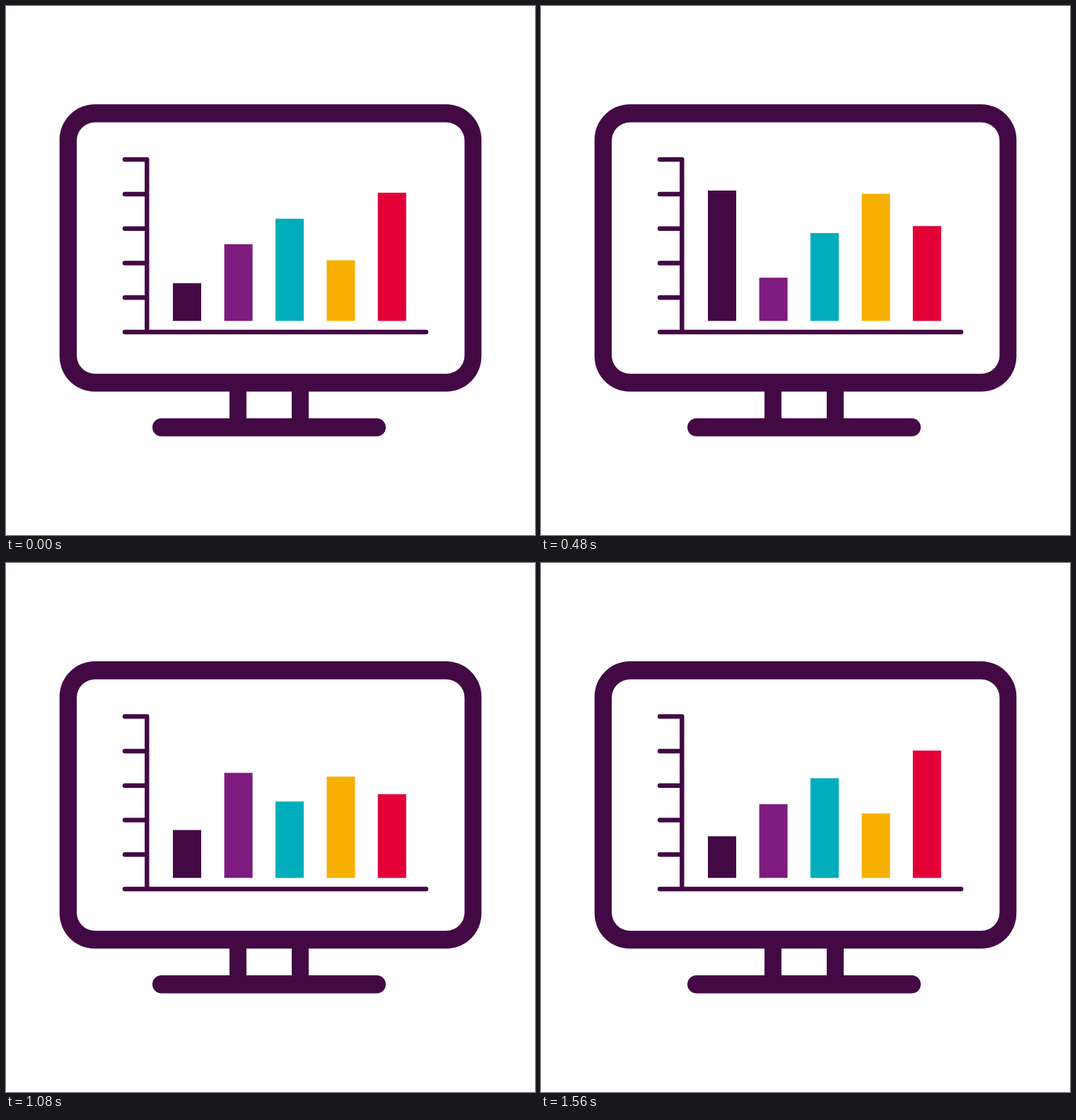
Write an HTML page that moves like this. It is 748 by 748 pixels and loops after 1600 ms.

```html
<!DOCTYPE html>
<html lang="en">
<head>
<meta charset="utf-8">
<title>Bar chart on a monitor</title>
<style>
  html, body { margin: 0; width: 100%; height: 100%; overflow: hidden; background: #fff; }
  svg { display: block; width: 100%; height: 100%; }
</style>
</head>
<body>
<svg viewBox="0 0 748 748" fill="#430945">
  <rect x="75.7" y="139" width="596.6" height="406.3" rx="50"/>
  <rect x="100" y="164.5" width="548.4" height="355.5" rx="26" fill="#fff"/>
  <path d="M316 544h24v40h-24zM404 544h24v40h-24z"/>
  <rect x="207" y="583" width="330" height="25.5" rx="12.75"/>
  <path d="M199.3 217V461M168 217h31.3M168 266h31.3M168 314.8h31.3M168 363.5h31.3M168 412.2h31.3M168 461H594"
        fill="none" stroke="#430945" stroke-width="6.4" stroke-linecap="round"/>
  <g id="bars"></g>
</svg>
<script>
  const LOOP = 1600, STEP = 40, BASE = 445.3;

  // keys: [time in ms, y of the bar's top]
  const bars = [
    { x: 236, color: '#430945', keys: [[0, 392], [440, 258], [920, 404], [1360, 316], [LOOP, 392]] },
    { x: 308.6, color: '#7d1c7e', keys: [[0, 336.8], [520, 385], [920, 233], [1320, 414], [LOOP, 336.8]] },
    { x: 381, color: '#00aebb', keys: [[0, 300.8], [240, 382], [760, 244.4], [1280, 383], [LOOP, 300.8]] },
    { x: 453.5, color: '#f8b000', keys: [[0, 359.5], [480, 265.5], [880, 368], [1280, 236], [LOOP, 359.5]] },
    { x: 525.8, color: '#e20037', keys: [[0, 264], [320, 323], [720, 289.5], [1120, 328], [LOOP, 264]] },
  ];

  const group = document.getElementById('bars');
  for (const bar of bars) {
    bar.rect = document.createElementNS('http://www.w3.org/2000/svg', 'rect');
    bar.rect.setAttribute('x', bar.x);
    bar.rect.setAttribute('width', 40);
    bar.rect.setAttribute('fill', bar.color);
    group.append(bar.rect);
  }

  const ease = p => p * p * (3 - 2 * p);

  function valueAt(keys, time) {
    const next = keys.findIndex(([t]) => t > time);
    const [t0, v0] = keys[next - 1], [t1, v1] = keys[next];
    return v0 + (v1 - v0) * ease((time - t0) / (t1 - t0));
  }

  function draw(now) {
    const time = Math.floor(now % LOOP / STEP) * STEP;
    for (const { rect, keys } of bars) {
      const top = valueAt(keys, time);
      rect.setAttribute('y', top);
      rect.setAttribute('height', BASE - top);
    }
  }

  const start = performance.now();
  function tick() {
    draw(performance.now() - start);
    requestAnimationFrame(tick);
  }
  tick();
</script>
</body>
</html>
```
